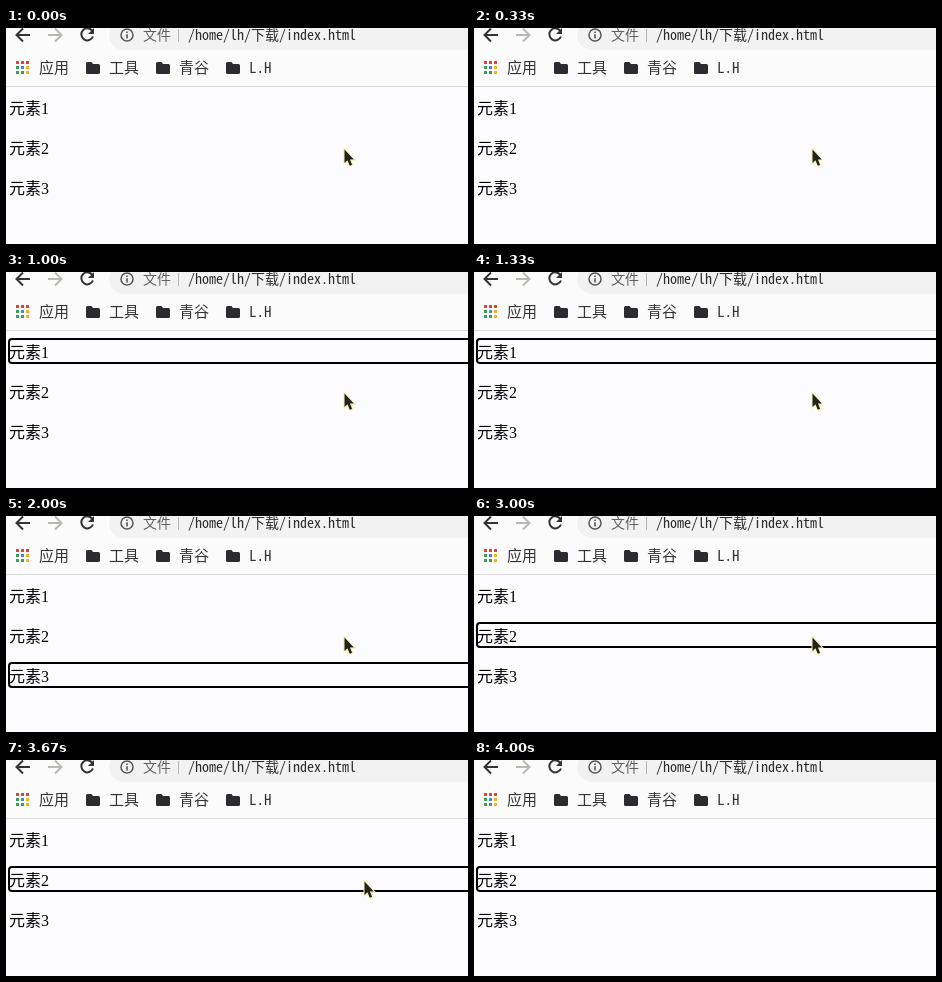
An HTML page that plays this animation: 462x216 px, repeating every 4.33 s.

```html
<!DOCTYPE html>
<html lang="zh-CN">
<head>
<meta charset="utf-8">
<title>Tab focus order</title>
<style>
  html, body { margin: 0; width: 100%; height: 100%; overflow: hidden; background: #fcfcfe; }
  svg { display: block; width: 100%; height: 100%; }
  .label { font: 15px "Noto Sans Mono CJK SC", "Noto Sans CJK SC", "Noto Sans CJK", monospace; fill: #333; }
  .address { font-size: 14px; fill: #2b2b2e; }
  .page { font: 16px "Liberation Serif", "Noto Sans CJK SC", "Noto Sans CJK", serif; fill: #000; }
  .icon { fill: none; stroke: #333; stroke-width: 2; }
</style>
</head>
<body>
<svg viewBox="0 0 462 216">
  <defs>
    <path id="arrow" d="M15 7H1.5M8 .5L1.5 7L8 13.5"/>
    <path id="folder" d="M1.5 0H5.5L7 2H12.5Q14 2 14 3.5V10.5Q14 12 12.5 12H1.5Q0 12 0 10.5V1.5Q0 0 1.5 0Z" fill="#2b2b30"/>
  </defs>

  <rect width="462" height="58" fill="#fcfbfc"/>
  <rect x="103" y="-8" width="390" height="30" rx="15" fill="#f3f2f3"/>
  <path d="M0 58.5H462" stroke="#dadadc"/>

  <use href="#arrow" x="9" class="icon"/>
  <use href="#arrow" class="icon" style="stroke:#b9b9b4" transform="matrix(-1 0 0 1 57 0)"/>
  <path d="M86.5 3.2A6 6 0 1 0 87 8.5" class="icon"/>
  <path d="M88 0V6H82Z" fill="#333"/>
  <circle cx="121" cy="7" r="6" class="icon" style="stroke:#555;stroke-width:1.5"/>
  <path d="M121 3.5V5M121 6.2V10.5" stroke="#555" stroke-width="1.6"/>
  <text x="137" y="12" class="label address" style="fill:#606064">文件</text>
  <path d="M172.5 1V14" stroke="#b4b4b8"/>
  <text x="182" y="12" class="label address">/home/lh/下载/index.html</text>

  <g id="apps"></g>
  <text x="33" y="45" class="label">应用</text>
  <use href="#folder" x="80" y="34"/>
  <text x="103" y="45" class="label">工具</text>
  <use href="#folder" x="150" y="34"/>
  <text x="173" y="45" class="label">青谷</text>
  <use href="#folder" x="220" y="34"/>
  <text x="243" y="45" class="label">L.H</text>

  <text x="3" y="86" class="page">元素1</text>
  <text x="3" y="126" class="page">元素2</text>
  <text x="3" y="166" class="page">元素3</text>
  <rect id="ring" x="3" width="480" height="24" rx="3" fill="none" stroke="#000" stroke-width="2"/>

  <path id="cursor" d="M0 0V13.5L3 10.8L5.3 16.2L7.6 15.2L5.4 9.9H9.3Z"
        fill="#222" stroke="#f6f2a0" stroke-width="2" paint-order="stroke"/>
</svg>
<script>
  const LOOP = 4330;
  const byId = id => document.getElementById(id);

  // Each track lists [start time, value]; values switch hard.
  const focus = [[0, 0], [1000, 1], [2000, 3], [3000, 2]];
  const cursorX = [[0, 338.5], [3670, 358.5], [4000, null]];
  const valueAt = (track, time) => track.findLast(([start]) => start <= time)[1];

  const [red, green, blue, yellow] = ["#e04438", "#3a9d58", "#4285e0", "#f0b428"];
  [red, red, red, green, blue, yellow, green, green, yellow].forEach((color, i) => {
    const dot = document.createElementNS("http://www.w3.org/2000/svg", "rect");
    const attributes = { x: 10 + i % 3 * 5, y: 33 + Math.floor(i / 3) * 5, width: 3, height: 3, fill: color };
    for (const name in attributes) dot.setAttribute(name, attributes[name]);
    byId("apps").append(dot);
  });

  function draw() {
    const time = performance.now() % LOOP;
    const item = valueAt(focus, time);
    const x = valueAt(cursorX, time);
    byId("ring").setAttribute("y", 27 + item * 40);
    byId("ring").style.display = item ? "" : "none";
    byId("cursor").setAttribute("transform", `translate(${x ?? 0} 121.5)`);
    byId("cursor").style.display = x === null ? "none" : "";
    requestAnimationFrame(draw);
  }
  draw();
</script>
</body>
</html>
```
